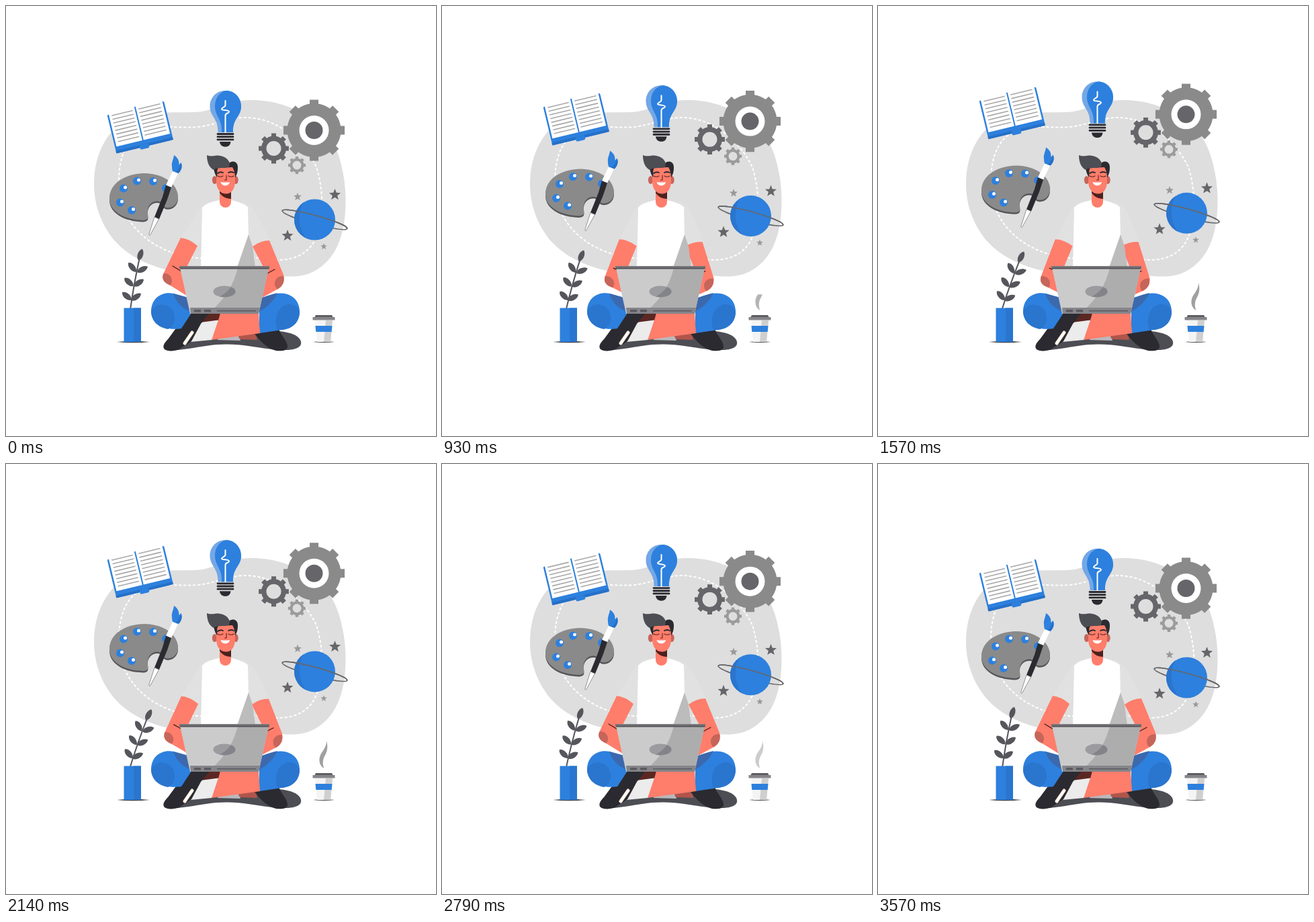
Recreate the animation shown at these times as an HTML page. Size 640x640 px, loop 3640 ms.

```html
<!DOCTYPE html>
<html lang="en">
<head>
<meta charset="utf-8">
<title>Creative work</title>
<style>
  html, body { margin: 0; width: 100%; height: 100%; overflow: hidden; background: #fff; }
  svg { display: block; width: 100vw; height: 100vh; }
  .blue { fill: #2d80dd; }
  .deep { fill: #2a75ce; }
  .dark { fill: #2a2a30; }
  .soft { fill: #4d4d54; }
  .skin { fill: #ff7d6b; }
  .line { fill: none; stroke-linecap: round; stroke-linejoin: round; }
</style>
</head>
<body>
<svg viewBox="0 0 640 640">
  <defs>
    <clipPath id="armL"><path id="armLShape" d="M260 345Q272 346 285 357L266 394L284 406V441L272 433L243 415C234 411 231 405 235 397Z"/></clipPath>
    <clipPath id="armR"><path id="armRShape" d="M367 358Q379 349 392 349L413 400C415 409 413 416 405 421L383 433L366 440V406L387 396Z"/></clipPath>
    <clipPath id="planetClip"><circle cx="459.5" cy="318" r="30.5"/></clipPath>
    <clipPath id="logoClip"><ellipse cx="325" cy="425" rx="16.5" ry="8.5"/></clipPath>
    <clipPath id="steamClip"><rect id="reveal" x="455" y="455" width="40" height="60"/></clipPath>
    <path id="board" d="M154 285C155 262 180 249 207 249C238 250 256 267 256 284C256 296 246 302 238 300C232 298 233 291 226 290.500C215 290 209 300 211 310C213 318 208 320 198 318.500C175 317 153 305 154 285Z"/>
  </defs>

  <!-- backdrop -->
  <path fill="#dedede" d="M131 265C131 225 147 190 175 172C200 156 240 159 280 158C312 157 325 140 365 140C400 140 420 150 440 158C480 174 501 218 505 275C508 328 496 363 476 382C455 402 435 404 410 402C370 398 300 400 262 397C215 390 180 372 158 345C138 318 131 290 131 265Z"/>
  <path class="line" stroke="#fff" stroke-width="2" stroke-dasharray="2.5 4.5" d="M168 265C167 225 180 187 220 181C245 178 262 182 285 180C310 178 330 166 358 166C405 167 444 202 462 240C473 275 474 320 460 348C448 372 422 381 392 377C350 370 320 378 285 375C225 370 169 330 168 265Z"/>

  <g id="gears"></g>

  <g id="book">
    <g transform="translate(151 160) rotate(-13.6)">
      <rect class="blue" x="-1" y="2" width="87" height="59" rx="2"/>
      <path fill="#2570c8" d="M-1 57H86V61H-1Z"/>
      <rect class="blue" x="35" y="57" width="14" height="7" rx="2"/>
      <path fill="#fff" d="M1.500 -1H83.500V51H1.500Z"/>
      <path class="blue" d="M41 0H43V53H41Z"/>
      <path id="rules" class="line" stroke="#a8a8a8" stroke-width="1.600"/>
    </g>
  </g>

  <g id="bulb">
    <path fill="#73a7e6" d="M326.500 126C313 126 303.500 136.500 303.500 149C303.500 165 316 167 315.500 188H338C337 167 350 165 350 149C350 136.500 340 126 326.500 126Z"/>
    <path class="blue" d="M328 126C317 128 311 138 311 149C311 164 322 168 321 188H338C337 167 350 165 350 149C350 136.500 340 126 328 126Z"/>
    <path class="line" stroke="#fff" stroke-width="2" d="M326.500 141V148C326 151 321 151 321 153.500C321 156 332 154 332 157.500C332 160 326.500 159 326.500 163V188"/>
    <path class="line" stroke="#2a2a30" stroke-width="2.800" d="M315 190.500H338M315 194.700H338M315 198.900H338"/>
    <path class="dark" d="M318 202H334.500C334 207 331 209.500 326.500 209.500C322 209.500 318.500 207 318 202Z"/>
  </g>

  <g id="palette">
    <use href="#board" y="2.500" fill="#55555a"/>
    <use href="#board" fill="#8a8a8a"/>
    <g id="paints"></g>
    <path class="blue" d="M250 222C249 229 246 233 247 239C247 243 248 245 248 246L256.500 249C261 245 263 239 260.500 233C259 235 258 236 257.500 236C258 230 255 225 250 222Z"/>
    <path fill="#2570c8" d="M260.500 233C263 239 261 245 256.500 249L252 247.500C257 244 259 239 260.500 233Z"/>
    <path fill="#fff" d="M248 246L256 249L246 270L238 266.500Z"/>
    <path class="dark" d="M238 266.500L246 270L240 288L228 317L221 314L233 284Z"/>
    <path fill="#fff" stroke="#55555a" stroke-width=".6" d="M221 314L227.500 317L215 340Q213 343 213 339Z"/>
  </g>

  <g id="space">
    <ellipse class="line" cx="459.500" cy="318" rx="50" ry="6.500" transform="rotate(15.300 459.500 318)" stroke="#66666a" stroke-width="1.700"/>
    <circle class="blue" cx="459.500" cy="318" r="30.500"/>
    <path class="deep" clip-path="url(#planetClip)" d="M448 286C432 302 433 334 451 350H425V286Z"/>
    <path class="line" stroke="#66666a" stroke-width="1.700" transform="rotate(15.300 459.500 318)" d="M409.500 318A50 6.500 0 0 1 509.500 318"/>
    <g id="stars"></g>
  </g>

  <!-- seat and legs -->
  <path class="soft" d="M240 513L264 499L320 494L400 484C426 484 441 493 439 503C438 510 425 513 406 512C380 510 360 504 330 503.500C298 503 275 512 240 513Z"/>
  <path fill="#b9b9bd" d="M318 494L346 489L349 498L314 497Z"/>
  <path fill="#b0554c" d="M345 490L372 487L374 497L348 496Z"/>
  <path class="dark" d="M370 488L406 481C410 491 419 499 419 507C419 513 410 514 402 513C390 510 381 502 370 488Z"/>
  <path class="blue" d="M376 437C391 429 405 426 415 428C430 431 437 442 437 455C437 469 428 480 411 482L377 487V440Z"/>
  <path class="deep" d="M404 482C398 466 404 447 420 444C430 443 436 449 437 455C437 469 428 480 411 482Z"/>
  <path fill="#3c69ad" d="M381 434L404 427C398 440 388 449 375 456Z"/>
  <path class="skin" d="M317 457H376L378 487L306 497Z"/>
  <path fill="#5b2723" d="M298 457H319L316 468L288 472Z"/>
  <path fill="#ececec" d="M289 471L316 467.500L306 497L274 500Z"/>
  <path class="dark" d="M274 457H303L290 473L276 499L262 508C256 514 241 515 236 511C232 507 236 501 241 496L265 463Z"/>
  <path class="line" stroke="#ffe4d0" stroke-width="5" d="M266 502L277 486"/>
  <path class="line" stroke="#fff" stroke-width="3" d="M266 502L277 486"/>
  <path class="blue" d="M276 457L261 480C235 484 216 472 216 454C216 435 232 424 250 428L274 435Z"/>
  <path class="deep" d="M216 454C222 441 242 441 249 455C254 467 249 478 241 481C225 478 216 468 216 454Z"/>
  <path fill="#3c69ad" d="M249 428L271 434L276 455C262 451 253 440 249 428Z"/>

  <!-- arms and body -->
  <g id="left">
    <path fill="#e1e1e1" d="M303 291C286 297 279 318 260 345L285 358L300 335Z"/>
    <use href="#armLShape" class="skin"/>
    <circle clip-path="url(#armL)" cx="236" cy="409" r="11" fill="#c6655a"/>
    <path class="line" stroke="#4a1f1d" stroke-width="1.300" d="M248 387L263 396"/>
  </g>
  <g id="right">
    <path fill="#e1e1e1" d="M351 291C371 297 378 318 393 349Q379 350 367 358L350 330Z"/>
    <use href="#armRShape" class="skin"/>
    <circle clip-path="url(#armR)" cx="411" cy="413" r="11" fill="#c6655a"/>
    <path class="line" stroke="#4a1f1d" stroke-width="1.300" d="M400 392L387 399"/>
  </g>
  <path fill="#fff" d="M318 289C307 291 297 294 292 300L290 390H362L360 299C353 294 346 291 335 289Z"/>
  <path fill="#bcbcbc" d="M361 340L367 358L371 389H344Z"/>

  <!-- head -->
  <path class="skin" d="M318 272H335V291C335 303 318 303 318 291Z"/>
  <path fill="#4d201e" d="M318 274H335V287C327 287 321 283 318 278Z"/>
  <ellipse cx="310.500" cy="259" rx="3.700" ry="6" fill="#c6655a"/>
  <ellipse cx="342" cy="259" rx="3.700" ry="6" fill="#c6655a"/>
  <path class="skin" d="M313 238H341V260C341 273 335 280 327 279.500C318 279 313 272 313 260Z"/>
  <path class="dark" d="M332 234C335 230 345 230 345 240C345 249 343 251 341 256C341 250 340 245 337 240L316 241C313 245 315 250 314 255C310 249 309 242 309 239L320 229Z"/>
  <path class="soft" d="M299 222C304 224.500 309 222.500 316 222.500C325 223 331 228 333 234L332 240C322 242 313 240 309 244C302 240 299 232 299 222Z"/>
  <path class="line" stroke="#2a2a30" stroke-width="1.900" d="M315 249Q319 246 323 248M331 248Q335 246 339 248"/>
  <path class="line" stroke="#6b2a26" stroke-width="1.200" d="M315 253Q319 255.500 323 253M331 253Q335 255.500 339 253M328 252V259H325.500"/>
  <path fill="#fff" d="M319.500 262Q326.500 263 333 262C332 269 321 269 319.500 262Z"/>

  <!-- laptop -->
  <path fill="#cbcbcb" d="M259 390H391L376 458H274Z"/>
  <path fill="#adadad" d="M345 390H391L376 458H300C323 440 338 418 345 390Z"/>
  <path fill="#77777b" d="M258 387H392V390H258Z"/>
  <path fill="#55555a" d="M258.500 389.500H391.500V391.500H259Z"/>
  <g clip-path="url(#logoClip)">
    <path fill="#9b9ba0" d="M308 416H342V434H308Z"/>
    <path fill="#83838a" d="M336 416H345V434H316C325 429 332 423 336 416Z"/>
  </g>
  <path fill="#85858a" d="M274 449H378L376 458H275Z"/>
  <path fill="#5a5a60" d="M280 452H290V455.500H280ZM295 452H305V455.500H295ZM314 453H372V454.400H314Z"/>

  <!-- plant -->
  <g id="plant">
    <path class="line" stroke="#55555c" stroke-width="2" d="M185 452Q190 415 199 374"/>
    <g id="leaves" fill="#55555c"></g>
  </g>
  <path fill="#44444a" d="M165 500Q189 497.500 214 500Q189 502.500 165 500Z"/>
  <path class="blue" d="M175.500 449.500H201V500H175.500Z"/>
  <path class="deep" d="M190 449.500H201V500H190Z"/>

  <!-- coffee -->
  <path id="steam" clip-path="url(#steamClip)" fill="#a0a0a0" d="M477 412C481 426 475 432 472.500 439C471 445 472 449 473.500 453C465 448 465 438 469 431C474 424 477 419 477 412Z"/>
  <path fill="#44444a" d="M457 500Q473 498 489 500Q473 502 457 500Z"/>
  <path fill="#f4f4f4" d="M460 468H486L483 500H463Z"/>
  <path fill="#cfcfcf" d="M476 468H486L483 500H473Z"/>
  <path class="blue" d="M460.500 476H485.500L484.600 485H461.300Z"/>
  <path fill="#5e5e63" d="M461 460H485L487 464H459Z"/>
  <path fill="#85858a" d="M456.500 463H489.500V467.500H456.500Z"/>
</svg>
<script>
const $ = id => document.getElementById(id);
const LOOP = 3640, STEPS = 51, STEP = LOOP / STEPS;

function add(parent, tag, attrs) {
  const el = document.createElementNS('http://www.w3.org/2000/svg', tag);
  for (const name in attrs) el.setAttribute(name, attrs[name]);
  parent.append(el);
}

function gear(x, y, outer, body, hole, half, fill) {
  const at = (r, a) => `${(x + r * Math.cos(a)).toFixed(2)} ${(y + r * Math.sin(a)).toFixed(2)}`;
  const inner = Math.asin(half / body), tip = Math.asin(half / outer);
  let d = '';
  for (let i = 0; i < 8; i++) {
    const a = i * Math.PI / 4;
    d += i ? `A${body} ${body} 0 0 1 ${at(body, a - inner)}` : `M${at(body, -inner)}`;
    d += `L${at(outer, a - tip)}L${at(outer, a + tip)}L${at(body, a + inner)}`;
  }
  d += `A${body} ${body} 0 0 1 ${at(body, -inner)}Z`;
  d += `M${x - hole} ${y}a${hole} ${hole} 0 1 0 ${2 * hole} 0a${hole} ${hole} 0 1 0 ${-2 * hole} 0Z`;
  add($('gears'), 'path', { d, fill, 'fill-rule': 'evenodd' });
}

function star(x, y, r, fill) {
  const points = Array.from({ length: 10 }, (_, i) => {
    const a = i * Math.PI / 5 - Math.PI / 2, k = i % 2 ? r * 0.43 : r;
    return [x + k * Math.cos(a), y + k * Math.sin(a)];
  });
  add($('stars'), 'polygon', { points: points.join(' '), fill });
}

add($('gears'), 'circle', { cx: 458.5, cy: 185, r: 23, fill: '#fff' });
gear(458.5, 185, 46, 40, 22, 6.5, '#8a8a8a');
add($('gears'), 'circle', { cx: 458.5, cy: 185, r: 13, fill: '#66666a' });
gear(398.5, 212, 22.7, 18.5, 11, 3.5, '#66666a');
gear(433, 237, 13.2, 10.5, 6.5, 2.2, '#9b9b9b');

star(489.5, 281, 9, '#66666a');
star(419, 342, 9, '#66666a');
star(434, 284, 6.3, '#999');
star(473, 358, 5, '#999');

$('rules').setAttribute('d', Array.from({ length: 8 }, (_, i) => {
  const y = 4.5 + i * 5.7;
  return `M6 ${y}H37M47 ${y}H79`;
}).join(''));

for (const [x, y] of [[175, 271.5], [195, 260.5], [219, 261], [170, 292.5], [187, 304], [238, 271]]) {
  add($('paints'), 'circle', { cx: x, cy: y, r: 6, class: 'blue' });
  add($('paints'), 'circle', { cx: x + 2.5, cy: y - 1.5, r: 2.5, fill: '#fff' });
}

for (const [x, y, turn] of [[200, 370, -72], [188, 389, 50], [203, 392, -28], [183, 411, 42],
  [197.5, 412, -34], [180, 432, 40], [193.5, 433, -34]]) {
  add($('leaves'), 'path', {
    d: 'M-9 0C-6 -5.5 5 -5.5 9 0C5 5.5 -6 5.5 -9 0Z',
    transform: `translate(${x} ${y}) rotate(${turn})`
  });
}

const clamp = v => Math.min(1, Math.max(0, v));
const ease = v => (1 - Math.cos(Math.PI * v)) / 2;
const ramp = (t, from, to) => clamp((t - from) / (to - from));
const lift = { gears: 24.5, book: 22, bulb: 14, palette: 12, space: 10 };

function draw(now) {
  const step = Math.floor((now + 2) / STEP) % STEPS;
  const t = step * STEP;
  const wave = ease(2 * (step + 0.5) / STEPS);

  for (const id in lift) $(id).setAttribute('transform', `translate(0 ${-lift[id] * wave})`);
  $('plant').setAttribute('transform', `rotate(${10 * wave} 186 449)`);

  const tuck = ease(ramp(t, 0, 480)) - ease(ramp(t, 1820, 2300));
  $('left').setAttribute('transform', `rotate(${-4.7 * tuck} 290 300)`);
  $('right').setAttribute('transform', `rotate(${5 * tuck} 365 300)`);

  $('reveal').setAttribute('y', 455 - 44 * ramp(t, 340, 1340));
  $('steam').setAttribute('opacity', ramp(t, 300, 1100) * (1 - ramp(t, 2200, 3450)));
}

const start = performance.now();
function tick() {
  draw(performance.now() - start);
  requestAnimationFrame(tick);
}
tick();
</script>
</body>
</html>
```
